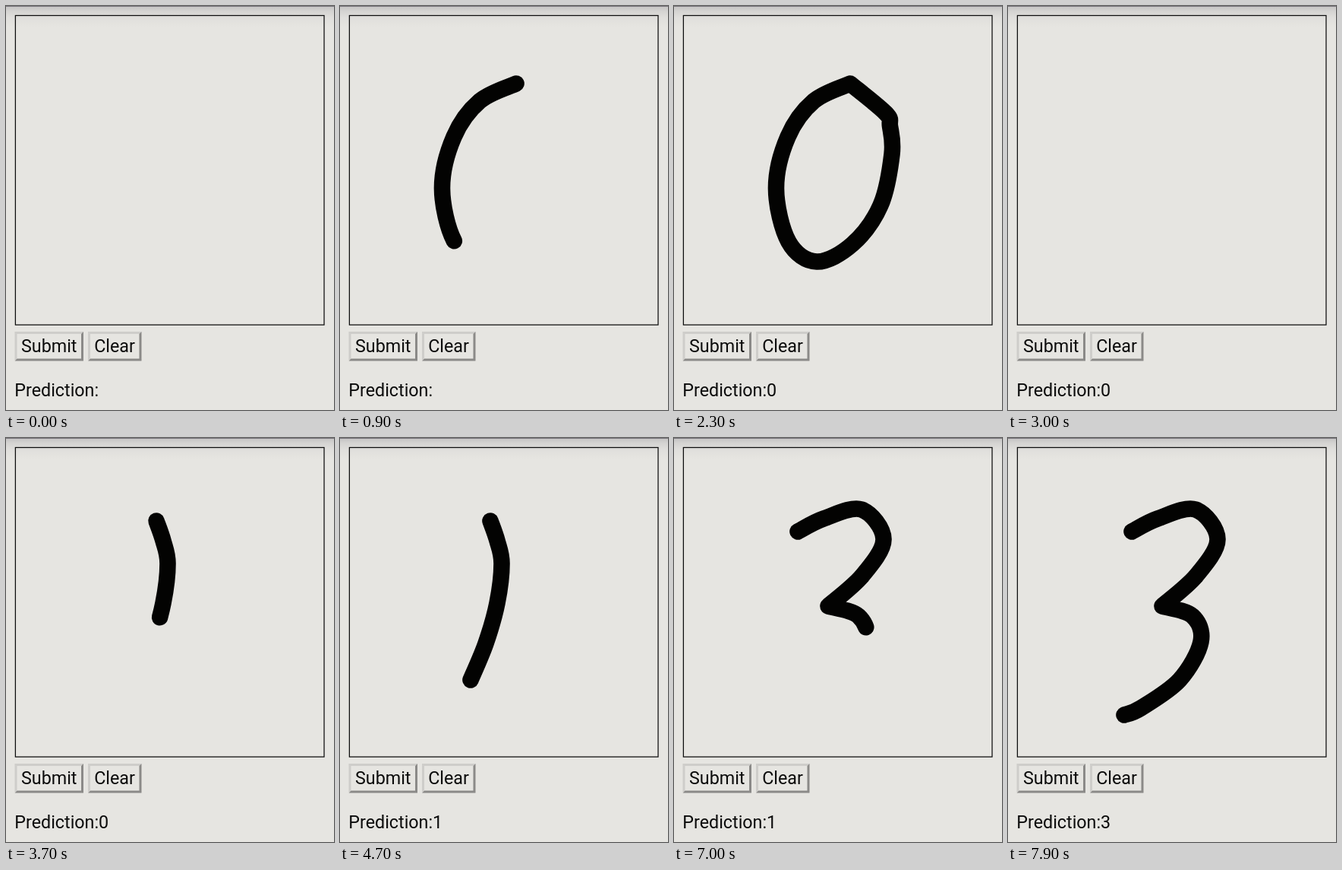
These frames come from a looping animation (432x531 px, 8000 ms). An HTML page:

```html
<!DOCTYPE html>
<html lang="en">
<head>
<meta charset="utf-8">
<title>Digit recogniser</title>
<style>
  html, body { margin: 0; width: 100%; height: 100%; overflow: hidden; background: #e6e5e1; }
  svg { display: block; width: 432px; height: 531px; }
  text { font: 23.3px Roboto, sans-serif; fill: #0b0b0b; }
  .pad { fill: none; stroke: #0c0c0c; stroke-width: 1.25; }
  .ink { fill: none; stroke: #030302; stroke-width: 21.6; stroke-linecap: round; stroke-linejoin: round; }
  .lit { fill: #cecdca; }
  .dim { fill: #8b8a88; }
</style>
</head>
<body>
<svg viewBox="0 0 432 531">
  <defs>
    <linearGradient id="shade" x2="0" y2="1">
      <stop offset="0" stop-color="#c4c3c3"/>
      <stop offset=".25" stop-color="#d5d4d2"/>
      <stop offset=".55" stop-color="#e0dfdc"/>
      <stop offset="1" stop-color="#e6e5e1"/>
    </linearGradient>
  </defs>
  <rect width="432" height="531" fill="#e6e5e1"/>
  <rect width="432" height="28" fill="url(#shade)"/>
  <rect width="432" height="1" fill="#77747b"/>
  <rect class="pad" x="12.4" y="12.5" width="406.6" height="406.6"/>
  <path class="ink" id="ink"/>

  <path class="lit" d="M11.5 428H102l-3 3H14.5V463l-3 3z"/>
  <path class="dim" d="M102 428V466.5H11.5l3-3H99V431z"/>
  <text x="20" y="455.3">Submit</text>

  <path class="lit" d="M108 428H178.5l-3 3H111V463l-3 3z"/>
  <path class="dim" d="M178.5 428V466.5H108l3-3H175.5V431z"/>
  <text x="116.2" y="455.3">Clear</text>

  <text x="11.3" y="513">Prediction:<tspan id="digit"></tspan></text>
</svg>
<script>
  const LOOP = 8000, TICK = 100;

  // The pen shows `first` px at once, then moves `speed` px per tick; "|" marks a sharp corner.
  const strokes = [
    { digit: '0', start: 700, read: 2200, clear: 3000, first: 109, speed: 72,
      keys: '232,102 184,125 150,172 134.5,240 151,310 188,336 235,313 272,262 287,195 284.5,158 279,141 232,102' },
    { digit: '1', start: 3500, read: 4600, clear: 5400, first: 40, speed: 45,
      keys: '198,109 207,135 213,165 207,217 192,270 172,318' },
    { digit: '3', start: 6500, read: 7900, clear: LOOP, first: 38, speed: 56,
      keys: '163,123 197,106 247,94 276,133 248,181 203,221|203,221 243,234 254,268 226,318 175,355 153,364' }
  ];

  // Catmull-Rom curve through the points, as Bezier segments
  function curve(points) {
    const at = i => points[Math.max(0, Math.min(i, points.length - 1))];
    const handle = (i, side) => at(i).map((v, k) => v + side * (at(i + 1)[k] - at(i - 1)[k]) / 6);
    return points.slice(1).map((p, i) => `C${handle(i, 1)} ${handle(i + 1, -1)} ${p}`).join('');
  }

  function toPath(keys) {
    const pieces = keys.split('|').map(piece => piece.split(' ').map(p => p.split(',').map(Number)));
    return 'M' + pieces[0][0] + pieces.map(curve).join('');
  }

  for (const s of strokes) s.path = toPath(s.keys);

  const ink = document.getElementById('ink');
  const digit = document.getElementById('digit');

  function draw(now) {
    const t = now % LOOP;
    const s = strokes.find(s => t >= s.start && t < s.clear);
    ink.setAttribute('d', s ? s.path : '');
    if (s) {
      const drawn = s.first + s.speed * Math.floor((t - s.start) / TICK);
      ink.setAttribute('stroke-dasharray', `${drawn} 2000`);
    }
    const answer = strokes.filter(s => t >= s.read).pop();
    digit.textContent = answer ? answer.digit : '';
    requestAnimationFrame(draw);
  }
  draw(0);
</script>
</body>
</html>
```
